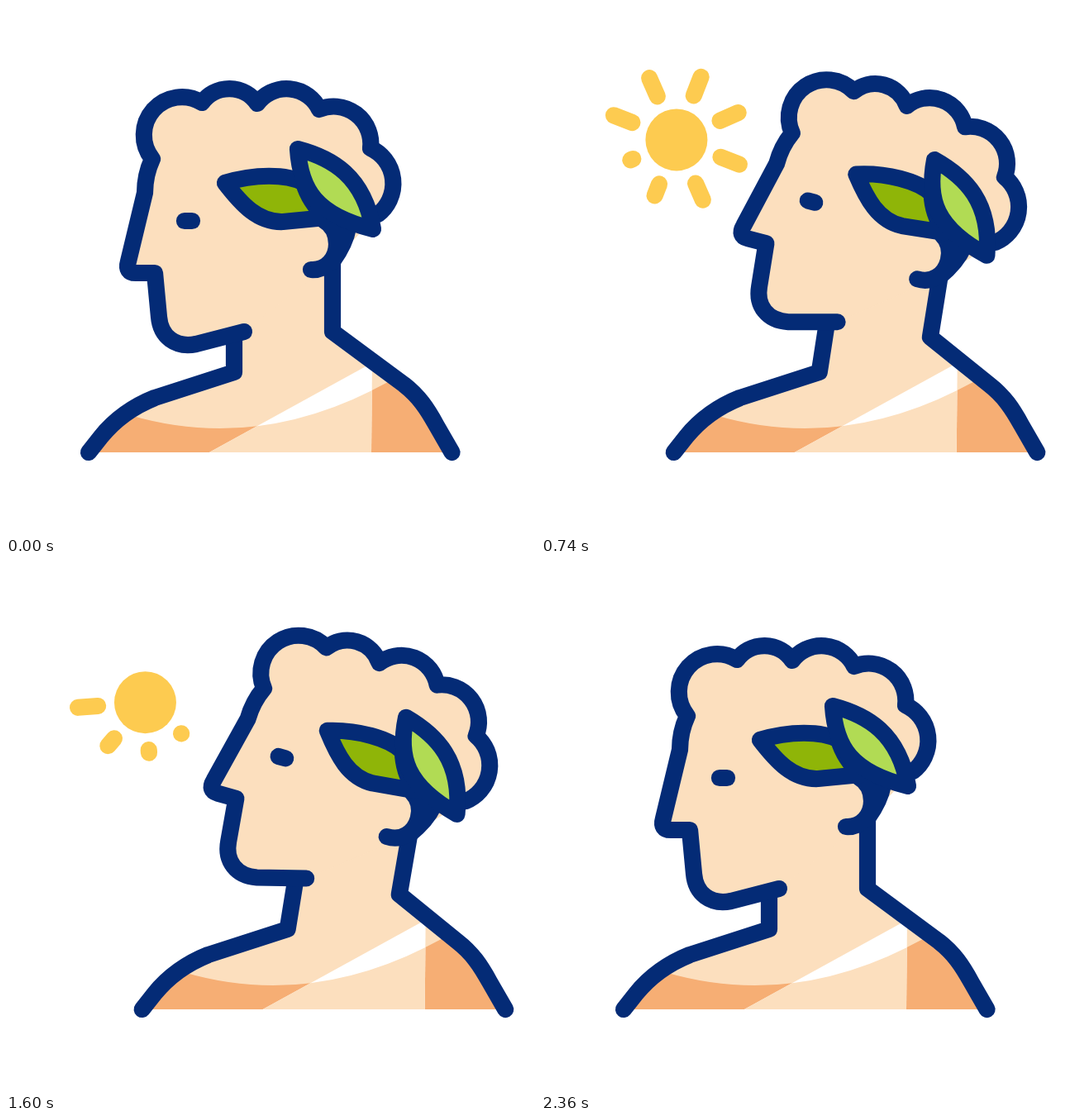
Write an HTML page with a canvas that moves like this. It is 640x640 px and loops after 2.4 s.

```html
<!DOCTYPE html>
<html lang="en">
<head>
<meta charset="utf-8">
<title>Classical bust and sun</title>
<style>
  html, body { margin: 0; width: 100%; height: 100%; overflow: hidden; background: #fff; }
  canvas { display: block; width: 640px; height: 640px; }
</style>
</head>
<body>
<canvas id="stage" width="640" height="640"></canvas>
<script>
const ctx = document.getElementById('stage').getContext('2d');
const LOOP = 2400, TURN = 1200;
const NAVY = '#042b76', SKIN = '#fcdfbe', ORANGE = '#f6ae74', YELLOW = '#fdcb50';
const GREEN = '#8fb508', LIME = '#b1db54';

const face = 'M288 394L230 409C205 414 187 400 185 376L180 323H157Q144 323 148 309L168 226' +
  'C168 210 171 198 177 185A46 46 0 0 1 237 117A41 41 0 0 1 304 118A44 44 0 0 1 379 125' +
  'A45 45 0 0 1 441 172A47 47 0 0 1 450 252';
const shapes = {
  face: new Path2D(face),
  headFill: new Path2D(face + 'L395 310Z'),
  ear: new Path2D('M369 319C388 320 400 305 400 288Q400 268 384 259M414 268C411 285 403 298 395 309'),
  eye: new Path2D('M216 260H225'),
  darkLeaf: new Path2D('M265 214C300 203 340 203 360 214C365 231 374 244 387 256L335 261C305 262 285 240 265 214Z'),
  limeLeaf: new Path2D('M353 173C395 184 433 206 444 270C375 253 356 222 353 173Z'),
  drape: new Path2D('M90 560V480L150 495Q306 541 462 455L560 400V560Z'),
  sash: new Path2D('M246 540L443 431.7L442 540Z')
};

const clamp = v => Math.min(1, Math.max(0, v));
const ramp = (t, from, to) => clamp((t - from) / (to - from));

// Symmetric cubic-bezier(a, 0, 1 - a, 1)
function ease(u, a) {
  let lo = 0, hi = 1;
  for (let i = 0; i < 24; i++) {
    const s = (lo + hi) / 2, r = 1 - s;
    if (3 * r * r * s * a + 3 * r * s * s * (1 - a) + s ** 3 < u) lo = s; else hi = s;
  }
  return lo * lo * (3 - 2 * lo);
}

function fill(path, color) {
  ctx.fillStyle = color;
  ctx.fill(path);
}

function stroke(path, color = NAVY) {
  ctx.strokeStyle = color;
  ctx.stroke(path);
}

function drawSun(t) {
  const away = t < TURN ? 1 - ease(ramp(t, 0, 945), .74) : ease(ramp(t, 1270, LOOP), .74);
  const turn = 40.5 * (Math.abs(t - TURN) / (t < TURN ? 600 : 400)) ** 2.4;
  ctx.save();
  ctx.translate(160 + 101 * away, 156 + 152 * away);
  const disc = new Path2D();
  disc.arc(0, 0, 37.5, 0, 2 * Math.PI);
  fill(disc, YELLOW);
  ctx.rotate((180 + turn) * Math.PI / 180);
  for (let k = 0; k < 8; k++) {
    const delay = 66 * k;
    const grow = 1 - (1 - ramp(t, 265 + delay, 475 + delay)) ** 2;
    const shrink = (1 - ramp(t, 1140 + delay, 1350 + delay)) ** 2;
    const size = grow * shrink;
    if (size > 0) stroke(new Path2D(`M57.5 0H${57.6 + 24 * size}`), YELLOW);
    ctx.rotate(Math.PI / 4);
  }
  ctx.restore();
}

function drawTorso(p, headPoint) {
  const left = `M100 540L115 521C132 500 155 484 180 474L276 443L${headPoint(276, 399)}`;
  const right = `${headPoint(395, 309)}L${395 + 18.5 * p} ${394 + 8 * p}` +
    'L481.5 458C499.5 472 509.5 487 520.5 507L539.5 540';
  const body = new Path2D(`${left}L${right}Z`);
  fill(body, SKIN);
  ctx.save();
  ctx.clip(body);
  fill(shapes.drape, ORANGE);
  fill(shapes.sash, '#fff');
  ctx.clip(shapes.sash);
  fill(shapes.drape, SKIN);
  ctx.restore();
  stroke(new Path2D(`${left}M${right}`));
}

function drawHead(matrix) {
  ctx.transform(...matrix);
  fill(shapes.headFill, SKIN);
  stroke(shapes.face);
  stroke(shapes.ear);
  stroke(shapes.eye);
  fill(shapes.darkLeaf, GREEN);
  stroke(shapes.darkLeaf);
  fill(shapes.limeLeaf, LIME);
  stroke(shapes.limeLeaf);
}

// The head morphs: every point travels straight from the rest pose to the raised pose.
const raised = new DOMMatrix()
  .translate(364.4, 217.5).rotate(17.7).translate(-300, -220);
function headMatrix(p) {
  const rest = [1, 0, 0, 1, 0, 0];
  return ['a', 'b', 'c', 'd', 'e', 'f'].map((key, i) => rest[i] + (raised[key] - rest[i]) * p);
}

function draw(t) {
  const p = t < TURN ? ease(t / TURN, .74) : 1 - ease(ramp(t, TURN, 2315), .8);
  const matrix = headMatrix(p);
  const [a, b, c, d, e, f] = matrix;
  const headPoint = (x, y) => `${a * x + c * y + e} ${b * x + d * y + f}`;
  ctx.fillStyle = '#fff';
  ctx.fillRect(0, 0, 640, 640);
  ctx.lineWidth = 20.2;
  ctx.lineCap = ctx.lineJoin = 'round';
  drawSun(t);
  ctx.save();
  ctx.translate(74.3 * p, 0);
  drawTorso(p, headPoint);
  drawHead(matrix);
  ctx.restore();
}

const start = performance.now();
function tick() {
  draw((performance.now() - start) % LOOP);
  requestAnimationFrame(tick);
}
tick();
</script>
</body>
</html>
```
